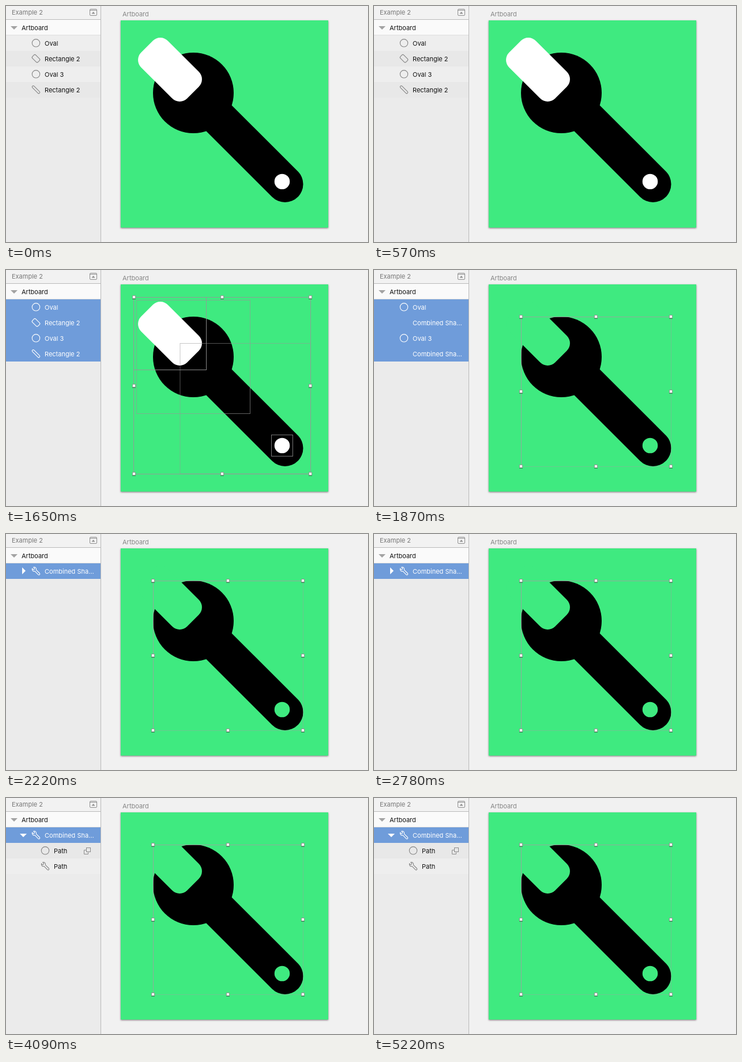
These frames come from a looping animation (628x410 px, 5270 ms). An HTML page:

```html
<!DOCTYPE html>
<html lang="en">
<head>
<meta charset="utf-8">
<style>
html, body { margin: 0; width: 100%; height: 100%; overflow: hidden; background: #f1f1f1 }
svg { display: block }
text { font: 11px Inter, Roboto, sans-serif }
.board { filter: drop-shadow(0 1px 1.5px rgba(0, 0, 0, .5)) }
.handle { fill: #f4fbf5; stroke: #8c9a90; filter: drop-shadow(0 1px .5px rgba(0, 0, 0, .35)) }
.icon { fill: none; stroke-width: 1.1 }
</style>
</head>
<body>
<svg width="628" height="410" viewBox="0 0 628 410">
  <rect width="164" height="410" fill="#ebebeb"/>
  <rect width="164" height="23" fill="#f2f2f2"/>
  <rect y="24" width="164" height="26" fill="#fafafa"/>
  <path d="M0 23.5H164M164.5 0V410" stroke="#b9b9b9"/>
  <path d="M0 50.5H164" stroke="#dedede"/>
  <text x="10" y="15" fill="#777">Example 2</text>
  <g stroke="#8e8e8e" fill="none">
    <rect x="145.5" y="5.5" width="12" height="11" rx="1.5"/>
    <path d="M146 7.5H157"/>
  </g>
  <path d="M148.5 13.5h6l-3-3.5z" fill="#8e8e8e"/>
  <path d="M8 35h12l-6 6z" fill="#a3a3a3"/>
  <text x="27" y="42" fill="#111">Artboard</text>
  <g id="list"></g>

  <text x="202" y="18" fill="#858585">Artboard</text>
  <rect class="board" x="199" y="25" width="360" height="360" fill="#3fea80"/>
  <circle cx="325" cy="151" r="70"/>
  <path d="M350 175.5L484 309.5" stroke="#000" stroke-width="63" stroke-linecap="round"/>
  <g id="cut">
    <rect x="-56.5" y="-32.7" width="113" height="65.4" rx="18.4" transform="translate(284.5 110.5) rotate(45)"/>
    <circle cx="479" cy="305" r="13.3"/>
  </g>
  <g id="selection"></g>
</svg>
<script>
const LOOP = 5270;
const STEPS = [0, 830, 1830, 1920, 3650]; // idle, selected, subtracting, merged, expanded
const $ = id => document.getElementById(id);

const wrench = 'M305 84A70 70 0 0 1 392 173L506 287A31.5 31.5 0 0 1 461 331L347 217' +
  'A70 70 0 0 1 259 131L288 160Q301 171 314 160L334 140Q345 127 334 114Z';
const icons = {
  oval: '<circle r="6.7"/>',
  rect: '<rect x="-6.8" y="-4" width="13.6" height="8" rx="2.2" transform="rotate(45)"/>',
  bar: '<rect x="-8.6" y="-1.9" width="17.2" height="3.8" rx="1.9" transform="rotate(45)"/>',
  wrench: `<path d="${wrench}" vector-effect="non-scaling-stroke" transform="scale(.052) translate(-385 -211)"/>`
};

function row(i, icon, label, on, x = 52) {
  const y = 51 + 27 * i;
  const back = on ? '#6f9cda' : i % 2 ? '#e8e8e8' : '#eeeeee';
  return `<rect y="${y}" width="164" height="27" fill="${back}"/>` +
    `<g class="icon" stroke="${on ? '#fff' : '#858585'}" transform="translate(${x} ${y + 13.3})">${icons[icon] || ''}</g>` +
    `<text x="${x + 15}" y="${y + 18}" fill="${on ? '#fff' : '#111'}">${label}</text>`;
}

const shapes = [['oval', 'Oval'], ['rect', 'Rectangle 2'], ['oval', 'Oval 3'], ['bar', 'Rectangle 2']];
const merged = 'Combined Sha…';

function list(step) {
  if (step < 3) return shapes.map(([icon, name], i) =>
    step === 2 && i % 2 ? row(i, '', merged, true) : row(i, icon, name, step > 0)).join('');
  const top = row(0, 'wrench', merged, true);
  if (step === 3) return top + '<path d="M28 58v12l6-6z" fill="#fff"/>';
  return top + '<path d="M24 62h12l-6 6z" fill="#fff"/>' +
    row(1, 'oval', 'Path', false, 68) + row(2, 'wrench', 'Path', false, 68) +
    '<g fill="none" stroke="#8a8a8a"><path d="M139.5 90.5h-4v7h7v-3"/><rect x="139.5" y="86.5" width="7" height="7"/></g>';
}

const box = (x, y, size, alpha) =>
  `<rect x="${x}" y="${y}" width="${size}" height="${size}" fill="none" stroke="#979797" stroke-opacity="${alpha}"/>`;

function handles(x, y, size) {
  let out = '';
  for (let i = 0; i < 9; i++) if (i !== 4)
    out += `<rect class="handle" x="${Math.round(x + i % 3 * size / 2) - 2.5}" y="${Math.round(y + (i / 3 | 0) * size / 2) - 2.5}" width="5" height="5"/>`;
  return out;
}

function selection(step) {
  if (!step) return '';
  if (step === 1) return box(221.5, 47.5, 126, .9) + box(226.5, 52.5, 197, .65) +
    box(302, 127.5, 226.5, .55) + box(460.5, 286.5, 37, .8) +
    box(221.5, 47.5, 307, .9) + handles(221.5, 47.2, 306.8);
  return '<path d="M255.5 341.5V81.5H515.5" fill="none" stroke="#a0a0a0" stroke-opacity=".85"/>' +
    '<path d="M515.5 81.5V341.5H255.5" fill="none" stroke="#a0a0a0" stroke-opacity=".45"/>' +
    handles(255.4, 81.4, 260);
}

let shown = -1;
function draw(now) {
  const t = now % LOOP;
  const step = STEPS.filter(s => s <= t).length - 1;
  if (step !== shown) {
    shown = step;
    $('list').innerHTML = list(step);
    $('selection').innerHTML = selection(step);
    $('cut').setAttribute('fill', step < 2 ? '#fff' : '#3fea80');
  }
}
const start = performance.now();
function tick() {
  draw(performance.now() - start);
  requestAnimationFrame(tick);
}
tick();
</script>
</body>
</html>
```
